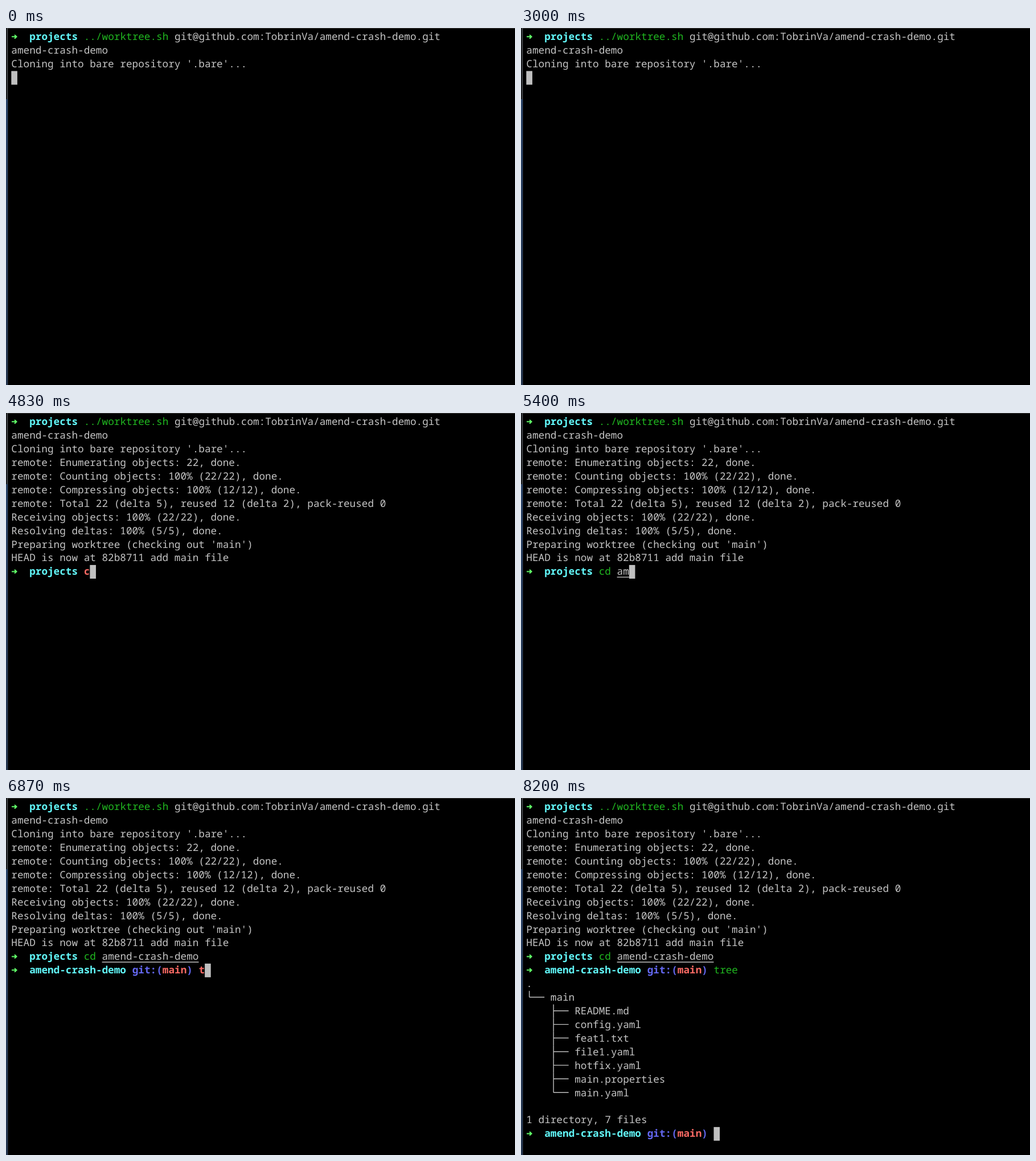
Recreate the animation shown at these times as an HTML page. Size 894 by 627 pixels, loop 8.23 s.

```html
<!DOCTYPE html>
<html lang="en">
<head>
<meta charset="utf-8">
<title>Worktree terminal</title>
<style>
  html, body { margin: 0; width: 100%; height: 100%; overflow: hidden; background: #000; }
  svg { display: block; width: 894px; height: 627px; }
  text { font: 400 17.7px "Noto Sans Mono", "DejaVu Sans Mono", monospace;
         white-space: pre; text-rendering: geometricPrecision; fill: #c5c5c5; }
  .cyan { fill: #62f8fa; font-weight: 600; }
  .blue { fill: #6468f2; font-weight: 600; }
  .red { fill: #f96a64; font-weight: 600; }
  .green { fill: #20b820; }
  .arrow { fill: #5ff967; }
  .rule { fill: none; stroke: #c0c0c0; stroke-width: 1.4; }
</style>
</head>
<body>
<svg viewBox="0 0 894 627">
  <defs>
    <linearGradient id="edge" x1="0" y1="0" x2="0" y2="1">
      <stop offset="0" stop-color="#2b4468"/>
      <stop offset="1" stop-color="#25364f"/>
    </linearGradient>
  </defs>
  <rect width="894" height="627"/>
  <rect width="894" height="1" fill="#383838"/>
  <rect width="2" height="125" fill="#191b1e"/>
  <rect x="2" width="1.2" height="125" fill="#56595d"/>
  <rect y="125" width="3" height="502" fill="url(#edge)"/>
  <rect x="3" y="125" width="1" height="502" fill="#181d26"/>
  <g id="screen"></g>
  <rect id="cursor" width="10.6" height="24" fill="#c0c0c0"/>
</svg>
<script>
const LOOP = 8230;
const LEFT = 9.3, TOP = 3.8, CELL_W = 10.62, CELL_H = 23.92;
const BASELINE = 17.45, UNDERLINE = 21.4, MIDDLE = 11.1;
const REPO = "amend-crash-demo";
const screen = document.getElementById("screen");
const cursor = document.getElementById("cursor");
const items = [];
const cursorStops = [];

const colX = col => LEFT + col * CELL_W;
const rowY = row => TOP + row * CELL_H;

function add(tag, attrs, from, to = LOOP) {
  const node = document.createElementNS("http://www.w3.org/2000/svg", tag);
  for (const key in attrs) node.setAttribute(key, attrs[key]);
  screen.append(node);
  items.push({ node, from, to });
  return node;
}

function print(from, row, col, text, style = "", to) {
  add("text", { x: colX(col), y: rowY(row) + BASELINE, class: style }, from, to).textContent = text;
}

function underline(from, row, col, length, to) {
  const y = rowY(row) + UNDERLINE;
  add("path", { d: `M${colX(col)} ${y}H${colX(col + length)}`, class: "rule" }, from, to);
}

function moveCursor(at, row, col) {
  cursorStops.push({ at, row, col });
}

function prompt(from, row, dir, branch) {
  const y = rowY(row) + MIDDLE + 0.4;
  add("path", { d: `M10 ${y - 1}h5.4l-1-2.6h1.8l3.8 3.6-3.8 3.6h-1.8l1-2.6h-5.4z`, class: "arrow" }, from);
  print(from, row, 3, dir, "cyan");
  let col = 4 + dir.length;
  if (branch) {
    print(from, row, col, "git:(", "blue");
    print(from, row, col + 5, branch, "red");
    print(from, row, col + 5 + branch.length, ")", "blue");
    col += 7 + branch.length;
  }
  moveCursor(from, row, col);
}

// Each step shows one state of a word until the next step replaces it.
function type(row, col, steps) {
  steps.forEach(([at, text, style], i) => {
    const to = steps[i + 1]?.[0];
    print(at, row, col, text, style, to);
    if (style === "path") underline(at, row, col, text.length, to);
    moveCursor(at, row, col + text.length);
  });
}

function treeBranch(from, row, col, name, last) {
  const x = colX(col + 0.5), y = rowY(row) + MIDDLE;
  const bottom = last ? y : rowY(row + 1);
  add("path", { d: `M${x} ${rowY(row)}V${bottom}M${x} ${y}H${colX(col + 3)}`, class: "rule" }, from);
  print(from, row, col + 4, name);
}

// Clone
prompt(0, 0, "projects");
print(0, 0, 12, "../worktree.sh", "green");
print(0, 0, 27, `git@github.com:TobrinVa/${REPO}.git`);
print(0, 1, 0, REPO);
print(0, 2, 0, "Cloning into bare repository '.bare'...");
moveCursor(0, 3, 0);
[
  [4030, "remote: Enumerating objects: 22, done."],
  [4030, "remote: Counting objects: 100% (22/22), done."],
  [4030, "remote: Compressing objects: 100% (12/12), done."],
  [4170, "remote: Total 22 (delta 5), reused 12 (delta 2), pack-reused 0"],
  [4170, "Receiving objects: 100% (22/22), done."],
  [4170, "Resolving deltas: 100% (5/5), done."],
  [4200, "Preparing worktree (checking out 'main')"],
  [4230, "HEAD is now at 82b8711 add main file"]
].forEach(([at, text], i) => {
  print(at, 3 + i, 0, text);
  moveCursor(at, 4 + i, 0);
});

// Change directory
prompt(4270, 11, "projects");
type(11, 12, [[4830, "c", "red"], [4950, "cd", "green"], [5080, "cd ", "green"]]);
type(11, 15, [[5230, "a", "path"], [5370, "am", "path"], [5600, REPO, "path"]]);
moveCursor(6070, 12, 0);
prompt(6170, 12, REPO, "main");

// List files
type(12, 31, [[6870, "t", "red"], [6970, "tr", "green"], [7100, "tre", "red"], [7230, "tree", "green"]]);
moveCursor(7570, 13, 0);
const listed = 7630;
print(listed, 13, 0, ".");
treeBranch(listed, 14, 0, "main", true);
["README.md", "config.yaml", "feat1.txt", "file1.yaml", "hotfix.yaml", "main.properties", "main.yaml"]
  .forEach((name, i, all) => treeBranch(listed, 15 + i, 4, name, i === all.length - 1));
print(listed, 23, 0, "1 directory, 7 files");
moveCursor(listed, 24, 0);
prompt(7700, 24, REPO, "main");

function render(t) {
  for (const { node, from, to } of items) {
    node.style.display = t >= from && t < to ? "" : "none";
  }
  const { row, col } = cursorStops.filter(stop => stop.at <= t).pop();
  cursor.setAttribute("x", colX(col));
  cursor.setAttribute("y", rowY(row));
}

const start = performance.now();
function tick() {
  render((performance.now() - start) % LOOP);
  requestAnimationFrame(tick);
}
tick();
</script>
</body>
</html>
```
